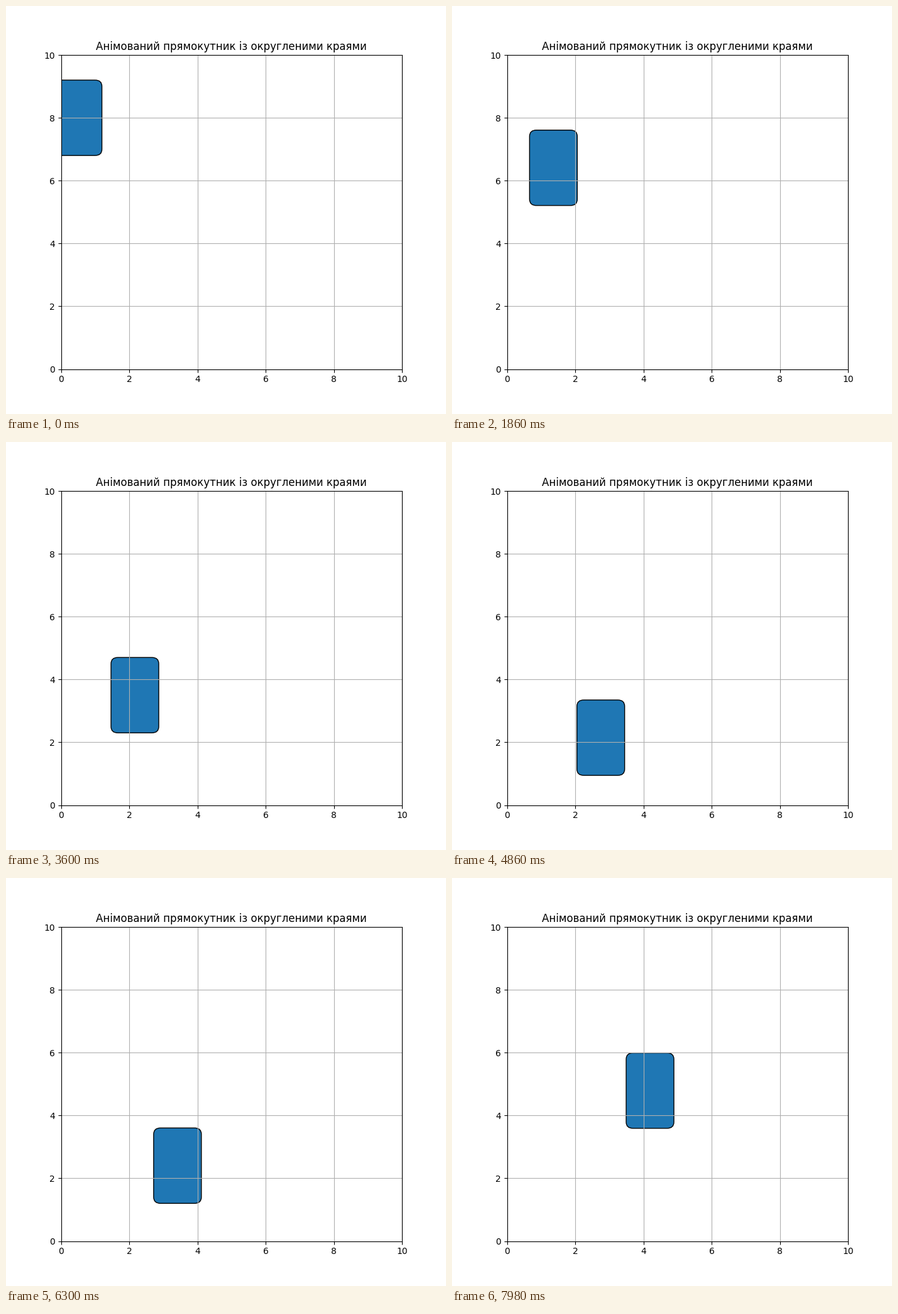
Write a matplotlib script that moves like this. It is 700x650 px and loops after 8000 ms.

```python
import math

import matplotlib.pyplot as plt
from matplotlib.animation import FuncAnimation
from matplotlib.patches import FancyBboxPatch

LOOP_MS = 8000
TICK_MS = 20
STEP_MS = 30  # the box moves one degree per step

fig, ax = plt.subplots(figsize=(7, 6.5), dpi=100)
ax.set_xlim(0, 10)
ax.set_ylim(0, 10)
ax.grid(True)
ax.set_title("Анімований прямокутник із округленими краями")

box = FancyBboxPatch((0, 7), 1, 2, boxstyle="round,pad=0.2",
                     facecolor="#1f77b4", edgecolor="black")
ax.add_patch(box)


def position(deg):
    return 5 * deg / 360, 4 + 3 * math.cos(math.radians(deg))


def update(tick):
    deg = (tick * TICK_MS + TICK_MS // 2) // STEP_MS
    x, y = position(deg)
    box.set_x(x)
    box.set_y(y)
    return (box,)


def init():
    return update(0)


anim = FuncAnimation(fig, update, frames=LOOP_MS // TICK_MS, init_func=init,
                     interval=TICK_MS, repeat=True, repeat_delay=0, blit=False)
plt.show()
```
